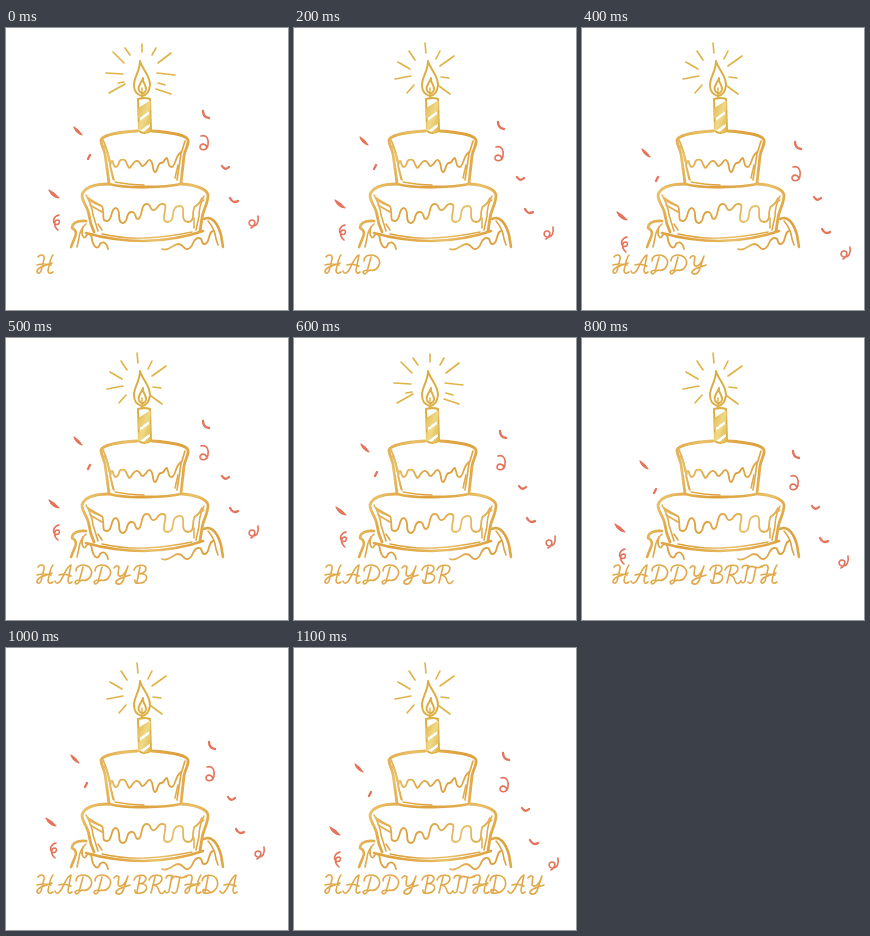
An HTML page for the animation above (1400 ms loop, 282 by 282 pixels).

```html
<!DOCTYPE html>
<html lang="en">
<head>
<meta charset="utf-8">
<title>Birthday cake</title>
<style>
html, body { margin: 0; width: 100%; height: 100%; overflow: hidden; background: #fff; }
svg { display: block; width: 100vw; height: 100vh; }
path { fill: none; stroke-linecap: round; stroke-linejoin: round; }
</style>
</head>
<body>
<svg viewBox="0 0 282 282" role="img" aria-label="HAPPY BRITHDAY">
  <defs>
    <linearGradient id="gold" gradientUnits="userSpaceOnUse" x1="70" y1="100" x2="105" y2="125" spreadMethod="reflect">
      <stop offset="0" stop-color="#dd9f3c"/>
      <stop offset=".6" stop-color="#e2ad4e"/>
      <stop offset="1" stop-color="#e8c06a"/>
    </linearGradient>
    <linearGradient id="wax" x1="0" y1="0" x2="1" y2="1">
      <stop offset="0" stop-color="#dfbb4e"/>
      <stop offset=".5" stop-color="#efd989"/>
      <stop offset="1" stop-color="#dfb94c"/>
    </linearGradient>
  </defs>
  <g id="rays" stroke="#dfb346" stroke-width="1.6"></g>
  <g id="candle" stroke="#dcae42" stroke-width="2"></g>
  <g id="cake" stroke="url(#gold)"></g>
  <g id="text" stroke="#e0a848" stroke-width="1.6"></g>
  <g id="confetti" stroke="#e5735a"></g>
</svg>
<script>
const NS = 'http://www.w3.org/2000/svg';

function add(parent, d, attrs = {}) {
  const path = document.createElementNS(NS, 'path');
  path.setAttribute('d', d);
  for (const key in attrs) path.setAttribute(key, attrs[key]);
  document.getElementById(parent).append(path);
  return path;
}

// Rays around the flame: two alternating poses
const rays = [
  'M136 16V24 M119 20L124 27 M150 20L146 27 M107 24L118 35 M165 25L152 35 M100 45L117 46 M151 45L169 47 M103 65L119 56 M152 55L159 57 M150 61L165 66 M112 55L118 54',
  'M131 15L132 25 M115 23L121 32 M146 23L142 31 M104 34L116 41 M160 28L146 38 M101 51L117 48 M147 49L155 50 M113 65L120 57 M145 58L156 66'
].map(d => add('rays', d));

// Candle and flame
add('candle', 'M134 33C136 41 144 47 144 57Q143 67 136 68Q128 66 128 57C128 48 134 44 134 33Z');
add('candle', 'M137 50C136 55 141 57 140 62Q138 67 134 64C130 60 135 56 137 50Z');
add('candle', 'M136 60V71', { 'stroke-width': 1.4 });
add('candle', 'M132 71Q138 69 144 71L145 103Q138 107 133 103Z');
add('candle', 'M133 80L144 73V82L133 90Z M133 94L144 86V95L133 103Z M138 104L144 99V103Z',
  { style: 'fill:url(#wax)', stroke: 'url(#wax)', 'stroke-width': 1 });

// Each entry: stroke width, outline
const cake = [
  // top tier
  [2.8, 'M131 103C114 104 97 107 95 112C95 117 98 121 99 126L103 155'],
  [2.8, 'M146 103C162 104 180 107 182 112C183 117 179 121 178 128L175 155'],
  [1.7, 'M97 112Q100 118 102 126L107 151 M179 113L175 126L171 152'],
  [2.8, 'M103 156Q120 160 140 159Q162 159 175 156'],
  [1.3, 'M109 154Q125 157 138 157'],
  [1.8, 'M98 118C104 123 101 135 105 134C108 130 106 139 110 139C114 138 112 132 115 132C120 130 120 135 122 138C124 144 126 134 130 133C135 132 134 139 137 138C141 136 141 131 144 132C148 134 146 144 149 144C152 144 151 135 155 135C159 135 158 130 161 130C163 135 162 139 166 139C170 137 169 128 175 124'],
  [1.6, 'M104 138L108 152 M172 137L169 150 M101 123L105 136'],
  // middle tier
  [2.8, 'M103 156C88 156 78 160 76 167C76 174 82 179 83 187Q84 195 88 204'],
  [2.8, 'M176 156C190 157 201 161 202 167C202 176 197 182 196 190L194 203'],
  [1.6, 'M80 167Q86 177 87 187L92 203 M198 168Q193 178 193 188L190 202'],
  [2.6, 'M80 205Q108 213 138 213Q172 212 197 203'],
  [1.4, 'M96 206Q118 211 140 210T186 204'],
  [1.8, 'M82 170C89 179 97 174 97 182C98 190 96 193 101 193C107 193 104 180 110 180C116 182 110 195 117 195C123 194 119 185 125 184C131 183 128 191 132 191C137 190 134 177 140 176C146 175 143 183 148 182C152 182 151 175 157 176C164 176 153 193 161 194C171 194 163 179 173 178C182 177 172 193 182 194C191 193 184 181 190 178Q194 175 196 170'],
  [1.5, 'M82 170L95 178 M84 177L96 184 M198 172L188 179 M92 196L96 202 M188 190V200'],
  // bottom tier
  [2.6, 'M80 193C70 192 66 196 66 200C70 202 71 205 69 209L65 219'],
  [2.6, 'M198 191C206 187 212 196 215 207L217 219'],
  [1.6, 'M80 196Q74 201 73 210L71 219 M202 193Q209 201 210 211L212 217'],
  [1.8, 'M77 199C74 208 79 212 80 208C83 204 86 207 86 212C88 220 92 222 94 216C98 212 101 216 102 221'],
  [1.8, 'M156 221C163 224 167 216 172 216C178 216 177 222 182 221C188 219 186 211 192 210C198 209 194 217 199 216C204 215 202 204 207 203']
];
for (const [width, d] of cake) add('cake', d, { 'stroke-width': width });

// Script capitals in a box 20 high
const glyphs = {
  H: 'M1 3C3 0 8 0 7 5L4 17Q2 21 0 18Q0 15 4 13L15 9 M16 1C13 4 12 12 11 17Q12 21 16 18 M0 11Q6 9 14 11',
  A: 'M0 17Q2 22 6 16C10 9 12 2 16 1L13 16Q13 21 17 18 M4 11Q9 9 16 12',
  P: 'M8 3L4 18Q1 22 0 18Q2 15 6 17 M1 7C1 0 10 0 14 3C20 9 14 18 7 16',
  Y: 'M1 4Q4 0 6 3C5 9 4 13 8 12Q12 11 15 2L10 17Q7 22 3 19C2 15 11 13 17 11',
  B: 'M6 3L3 18 M0 6C2 0 11 0 12 4Q12 9 5 10C16 8 14 19 6 19Q0 20 1 16',
  R: 'M6 3L2 19 M0 6C2 0 12 0 13 4Q13 10 5 11Q9 12 10 17Q12 22 16 17',
  I: 'M8 2Q2 0 1 4 M7 2L4 17Q2 21 0 17',
  T: 'M0 5Q2 1 6 3T14 2 M8 3L5 17Q3 21 0 18',
  D: 'M6 3L3 18 M0 7C1 0 10 0 14 4C19 12 12 19 6 19Q0 20 1 16Q4 14 8 18'
};
// letter, x, time step at which it appears
const letters = [
  ['H', 31, 0], ['A', 49, 1], ['P', 69, 2], ['P', 88, 3], ['Y', 107, 4], ['B', 128, 5],
  ['R', 143, 6], ['I', 159, 7], ['T', 166, 7], ['H', 179, 8], ['D', 196, 9], ['A', 214, 10], ['Y', 233, 11]
].map(([name, x, start]) => ({
  start,
  node: add('text', glyphs[name], { transform: `translate(${x} 226)` })
}));

// Confetti: outline, x, y; the first four pieces drift left, the others right
const dash = 'M-5-4Q-2 3 5 4Q1-1-5-4Z';
const confetti = [
  ['M-4-4Q-2 2 4 4Q1-1-4-4Z', 72, 103],
  ['M1-2Q0 0-1 2', 83, 129],
  [dash, 48, 166],
  ['M3-7C-2-6-4-1-1 2C3 4 5-1 2-2C-2-2-3 4 2 8', 50, 194],
  ['M-3-4Q-3 2 3 3', 200, 87],
  ['M-3-7C3-9 5-3 4 2C3 8-4 8-4 4C-4 0 2 0 3 5', 198, 115],
  ['M-3-2Q0 3 4-1', 219, 140],
  ['M-4-3Q-1 3 4 0', 228, 173],
  ['M5-6C6 0 4 4 0 4C-5 4-5-2-1-2C3-2 3 3-2 6', 247, 194]
].map(([d, x, y], i) => ({
  x, y, right: i > 3,
  node: add('confetti', d, {
    'stroke-width': d.includes('C') ? 1.6 : d.endsWith('Z') ? 1.2 : 2.3,
    style: d.endsWith('Z') ? 'fill:#e5735a' : ''
  })
}));

// Confetti drift per step: left x, left y, right x, right y
const drift = [
  [0, 0, 0, 0], [-1, 5, 4, 6], [-2, 10, 7, 11], [-5, 16, 12, 21],
  [-8, 22, 16, 31], [0, 0, 0, 0], [-1, 7, 9, 10], [-6, 16, 12, 21],
  [-10, 24, 14, 30], [0, 0, 0, 0], [-3, 8, 6, 11], [-7, 17, 12, 22]
];

function draw(ms) {
  const step = Math.min(11, Math.floor(ms / 100));
  rays.forEach((ray, i) => ray.style.display = (step % 3 > 0) === (i > 0) ? '' : 'none');
  for (const { node, start } of letters) node.style.display = step >= start ? '' : 'none';

  const [lx, ly, rx, ry] = drift[step];
  for (const { x, y, right, node } of confetti) {
    const dx = right ? rx : lx, dy = right ? ry : ly;
    node.setAttribute('transform', `translate(${x + dx} ${y + dy})`);
  }
}

const begin = performance.now();
function tick() {
  draw((performance.now() - begin) % 1400);
  requestAnimationFrame(tick);
}
tick();
</script>
</body>
</html>
```
